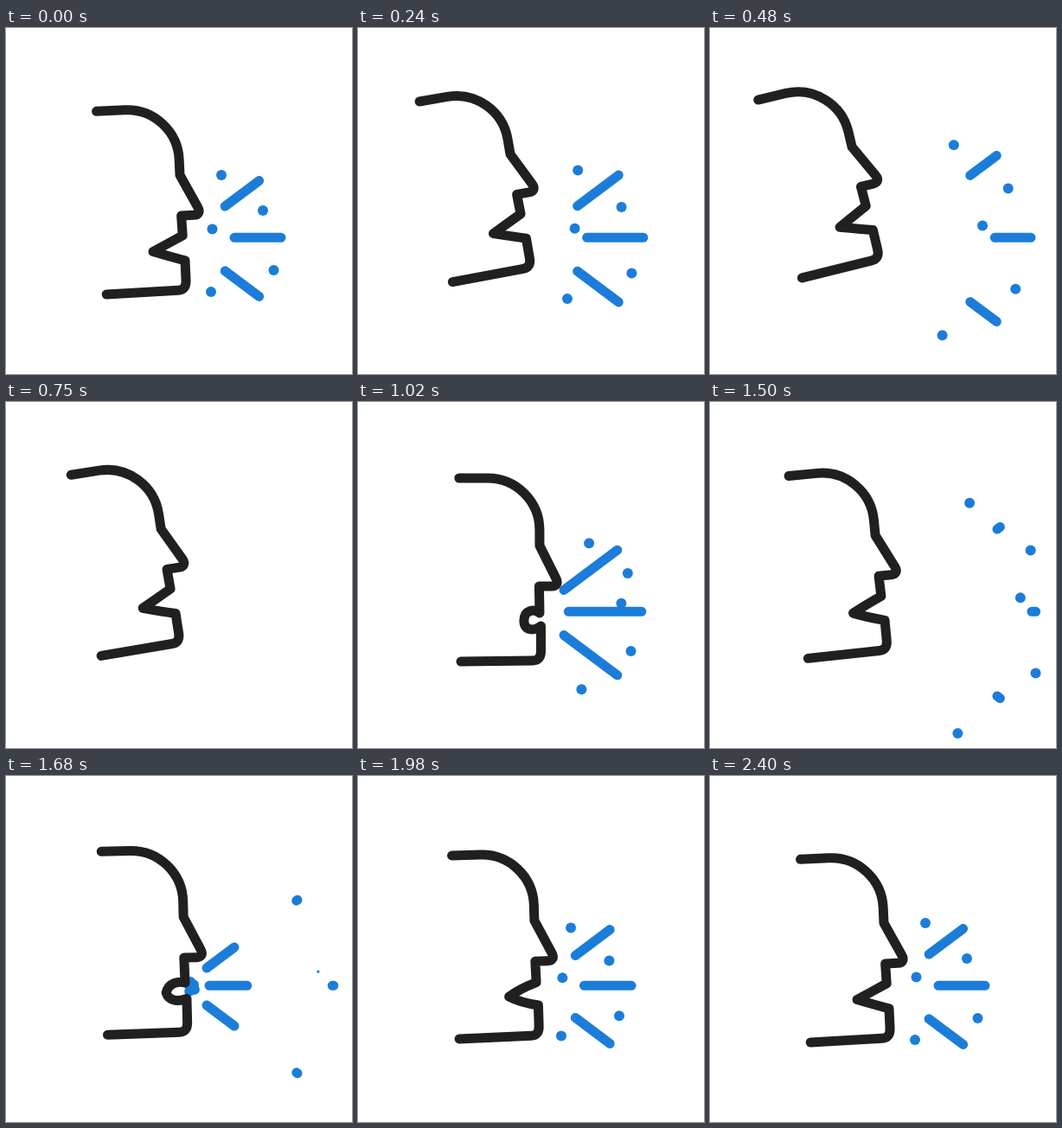
An HTML page with a canvas for the animation above (2430 ms loop, 400 px wide and 400 px high).

```html
<!DOCTYPE html>
<html lang="en">
<head>
<meta charset="utf-8">
<title>Cough</title>
<style>
html, body { margin: 0; width: 100%; height: 100%; overflow: hidden; background: #fff; }
canvas { display: block; width: 400px; height: 400px; }
</style>
</head>
<body>
<canvas id="stage" width="400" height="400"></canvas>
<script>
const LOOP = 2430, STEP = 30;
const INK = '#212020', BLUE = '#1b7dd9';
const ctx = document.getElementById('stage').getContext('2d');

// Droplets, in the order in which they vanish: where they rest and where they end
const MOUTH = Array(5).fill([210, 244]);
const REST = [[237, 305], [249, 170], [297, 211], [309.5, 280], [238.5, 232.5]];
const END = [[288, 386], [302, 114], [374, 170], [380, 315], [362, 226]];

const clamp = u => Math.min(1, Math.max(0, u));
const mix = (a, b, k) => a + (b - a) * k;
const smooth = (t, start, end) => {
  const u = clamp((t - start) / (end - start));
  return u * u * (3 - 2 * u);
};
const launch = (t, start, decay) => 1 - Math.exp(-Math.max(0, t - start) / decay);

// A horizontal ray between two x positions, and two diagonal ones beside it
function drawRays(tail, tip) {
  const sideX = x => 232 + .73 * (x - 235);
  const rise = x => 45.5 + .75 * (x - 264);
  ctx.beginPath();
  ctx.moveTo(tail, 242.3);
  ctx.lineTo(tip + .01, 242.3);
  for (const side of [-1, 1]) {
    for (const [method, x] of [['moveTo', sideX(tail)], ['lineTo', sideX(tip) + .01]]) {
      ctx[method](x, 243.5 + side * rise(x));
    }
  }
  ctx.stroke();
}

// Droplets on their way; they vanish one after the other
function drawDroplets(from, to, k, t, vanish = Infinity, stagger = 0) {
  from.forEach(([x, y], i) => {
    const radius = 6 * clamp((vanish + i * stagger - t) / 70);
    ctx.beginPath();
    ctx.arc(mix(x, to[i][0], k), mix(y, to[i][1], k), radius, 0, 7);
    ctx.fill();
  });
}

function drawBursts(t) {
  // The resting burst flies off
  if (t < 700) drawRays(mix(264, 380, smooth(t, 220, 700)), mix(318, 380, smooth(t, 100, 600)));
  if (t < 740) drawDroplets(REST, END, smooth(t, 120, 740), t, 690, 10);
  // A full cough
  if (t > 841 && t < 1720) drawRays(mix(235, 380, launch(t, 1010, 170)), mix(235, 380, launch(t, 841, 175)));
  if (t > 860 && t < 1720) drawDroplets(MOUTH, END, launch(t, 860, 165), t, 1590, 27);
  // A last one that comes to rest
  if (t > 1605) drawRays(mix(235, 264, launch(t, 1690, 120)), mix(235, 318, launch(t, 1605, 100)));
  if (t > 1670) drawDroplets(MOUTH, REST, launch(t, 1670, 120), t);
}

// Leaning moves and tilts the head; the mouth is round when upright, a wedge when leaning back
function drawHead(t) {
  const lean = -9
    - 38 * (1 - (1 - clamp(t / 580)) ** 2)
    + 47 * smooth(t, 580, 1010)
    - 27 * smooth(t, 1010, 1340)
    + 24 * smooth(t, 1340, 1750)
    - 6 * smooth(t, 1750, 2200);
  const sag = 1 - smooth(t, 0, 300) + smooth(t, 1750, 2200);
  const open = clamp(sag - lean / 20);
  const round = 1 - open;
  const upper = 78 - 8 * open, lower = 93 + 6 * open;
  const corner = -18 - 17 * open, cornerY = 87, lipX = 1.5;

  ctx.save();
  ctx.translate(210 + lean, 166 + .62 * lean + 9.6 * sag);
  ctx.rotate(lean / 3.45 * Math.PI / 180);
  ctx.beginPath();
  ctx.moveTo(-93, -78);
  ctx.lineTo(-60, -78);
  ctx.bezierCurveTo(-27, -78, 0, -51, 0, -18);
  ctx.lineTo(0, 0);
  ctx.lineTo(19, 38);
  ctx.bezierCurveTo(22, 44, 19, 47, 14, 47);
  ctx.lineTo(-.5, 47);
  ctx.lineTo(0, upper);
  ctx.bezierCurveTo(corner / 3, mix(upper, cornerY, 1 / 3) - 8 * round,
    corner * 2 / 3 - 6 * round, mix(cornerY, upper, 1 / 3) - 10 * round, corner, cornerY);
  ctx.bezierCurveTo(corner * 2 / 3 - 6 * round, mix(cornerY, lower, 1 / 3) + 10 * round,
    corner / 3, mix(lower, cornerY, 1 / 3) + 8 * round, lipX, lower);
  ctx.lineTo(lipX, 122);
  ctx.quadraticCurveTo(lipX, 133, -8, 133);
  ctx.lineTo(-91, 134);
  ctx.stroke();
  ctx.restore();
}

function draw(now) {
  const t = Math.floor(now % LOOP / STEP) * STEP % (LOOP - STEP);
  ctx.fillStyle = '#fff';
  ctx.fillRect(0, 0, 400, 400);
  ctx.lineCap = ctx.lineJoin = 'round';
  ctx.lineWidth = 11;
  ctx.fillStyle = ctx.strokeStyle = BLUE;
  drawBursts(t);
  ctx.strokeStyle = INK;
  drawHead(t);
  requestAnimationFrame(() => draw(performance.now()));
}
draw(0);
</script>
</body>
</html>
```
